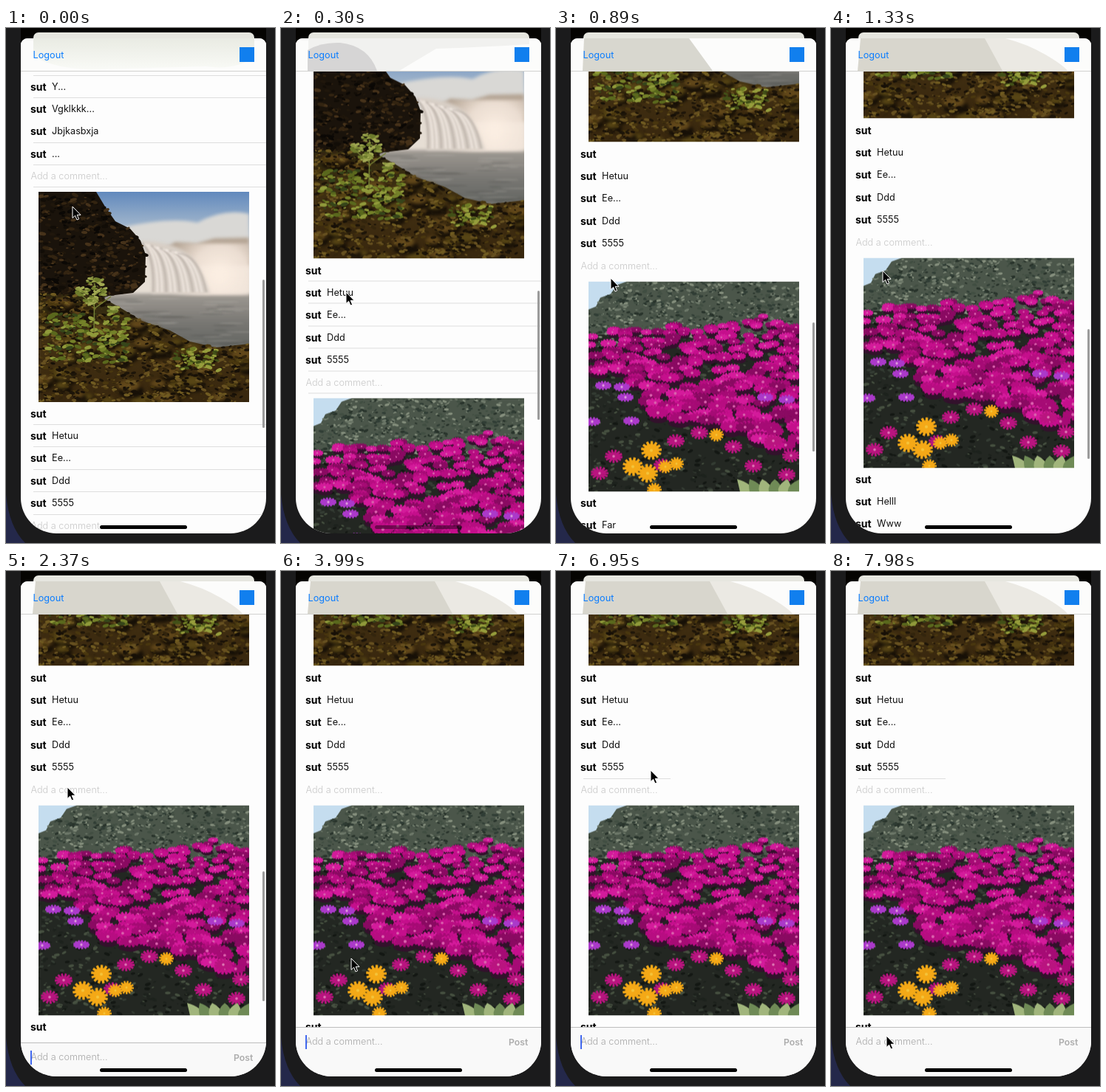
An HTML page with a canvas that plays this animation: 364 px wide and 698 px high, repeating every 8 s.

```html
<!DOCTYPE html>
<html lang="en">
<head>
<meta charset="utf-8">
<title>Photo feed</title>
<style>
html, body { margin: 0; width: 100%; height: 100%; overflow: hidden; background: #1b1b1c; }
body { position: relative; font: 12.7px/20px Inter, "Open Sans", sans-serif; color: #111; }
body *, body { box-sizing: border-box; }
body div, body svg, body canvas, body span { position: absolute; white-space: nowrap; }
.anim { animation: 8s step-end infinite; }

#corner { left: 0; top: 0; }
#behind { left: 20px; top: 0; width: 332px; height: 685px; background: #050402; border-radius: 0 0 48px 48px; }
#card { left: 37px; top: 6px; width: 299px; height: 20px; background: #e6e6df; border-radius: 7px 7px 0 0; }
#screen { left: 20px; top: 14px; width: 332px; height: 671px; background: #fdfdfd;
  border-radius: 9px 9px 48px 48px; overflow: hidden; }

/* Feed coordinates are stage coordinates at rest */
#feed { left: -20px; top: -14px; width: 364px; height: 1200px; animation-name: scroll; }
#feed canvas { left: 44px; }
.name { left: 33px; font-size: 14px; font-weight: 700; color: #000; }
.text { left: 62px; }
.hint { left: 33.5px; color: #c9c9c9; font-weight: 300; }
.rule { left: 37px; width: 315px; height: 1px; background: #dedede; animation-name: rules; }
.early { animation-name: early; }
.late { animation-name: late; }
#restored { left: 37px; top: 659px; width: 118px; height: 1px; background: #dedede; animation-name: restored; }

#nav { left: 0; top: 0; width: 332px; height: 45px; background: #fcfcfb; border-bottom: 1px solid #d2d2d0; }
#nav svg { left: 0; top: 0; }
#logout { left: 16.5px; top: 12.5px; color: #087cff; }
#badge { left: 296px; top: 12px; width: 20px; height: 20px; background: #117fee; }
#tint0 { animation-name: tint0; }
#tint1 { animation-name: tint1; }
#tint2 { animation-name: tint2; }
#tint3 { animation-name: tint3; }

#thumb { left: 327px; top: 0; width: 3px; border-radius: 2px; background: #9b9b9b; animation-name: thumb; }
#bar { left: 0; top: 604px; width: 332px; height: 90px; background: #f9f9f9; border-top: 1px solid #bdbdbd;
  animation-name: bar; }
#bar .hint { left: 13.5px; top: 9px; color: #a9a9a9; }
#post { left: 288px; top: 10px; font-size: 12.3px; font-weight: 600; color: #adadad; }
#caret { left: 13px; top: 9.5px; width: 1.8px; height: 19px; background: #4168ee; animation-name: caret; }
#home { left: 107px; top: 660px; width: 118px; height: 5px; border-radius: 2.5px; background: #000; animation-name: home; }
#pointer { left: 0; top: 0; overflow: visible; animation-name: pointer; }

@keyframes scroll {
  0% { transform: translateY(0); }
  1.8% { transform: translateY(-64px); }
  3.7% { transform: translateY(-194.5px); }
  5.4% { transform: translateY(-254px); }
  7.3% { transform: translateY(-298px); }
  9.2% { transform: translateY(-330px); }
  11.1% { transform: translateY(-352.5px); }
  12.9% { transform: translateY(-367px); }
  14.8% { transform: translateY(-378px); }
  16.6% { transform: translateY(-384.5px); }
  18.4%, 100% { transform: translateY(-378.5px); }
}
@keyframes thumb {
  0% { transform: translateY(327px); height: 201px; opacity: 1; }
  1.8% { transform: translateY(333px); height: 190px; }
  3.7% { transform: translateY(342px); height: 175px; }
  5.4% { transform: translateY(359px); height: 175px; }
  7.3% { transform: translateY(371px); height: 175px; }
  9.2% { transform: translateY(379px); height: 175px; }
  11.1% { transform: translateY(385px); height: 175px; }
  12.9% { transform: translateY(389px); height: 176px; }
  14.8% { transform: translateY(392px); height: 176px; }
  16.6% { transform: translateY(394px); height: 176px; }
  18.4% { transform: translateY(393px); height: 176px; opacity: 1; }
  40.7% { transform: translateY(393px); height: 176px; opacity: .45; }
  42.4%, 100% { transform: translateY(393px); height: 176px; opacity: 0; }
}
@keyframes pointer {
  0% { transform: translate(90px, 242px); opacity: 1; }
  1.8% { transform: translate(91px, 488px); }
  3.7% { transform: translate(88px, 358px); }
  5.4% { transform: translate(80px, 322px); }
  7.3% { transform: translate(75px, 325px); }
  9.2% { transform: translate(74px, 333px); }
  11.1% { transform: translate(74px, 339px); }
  12.9% { transform: translate(73px, 336px); }
  14.8% { transform: translate(71px, 331px); }
  16.6% { transform: translate(70px, 329px); }
  18.4% { transform: translate(70px, 340px); }
  22.1% { transform: translate(76px, 314px); }
  23.9% { transform: translate(83px, 293px); }
  46.2% { transform: translate(85px, 325px); }
  48% { transform: translate(90px, 415px); }
  49.8% { transform: translate(95px, 525px); }
  51.7% { transform: translate(96px, 615px); }
  53.5% { transform: translate(88px, 645px); }
  55.4% { transform: translate(66px, 634px); }
  57.2% { transform: translate(36px, 600px); }
  59.1% { transform: translate(6px, 560px); opacity: 1; }
  60.9% { transform: translate(-30px, 540px); opacity: 0; }
  84.9% { transform: translate(142px, 261px); opacity: 1; }
  86.8% { transform: translate(128px, 270px); }
  88.7% { transform: translate(112px, 282px); }
  90.4% { transform: translate(98px, 289px); }
  92.3% { transform: translate(90px, 294px); }
  96% { transform: translate(87px, 385px); }
  97.8% { transform: translate(80px, 540px); }
  99.7%, 100% { transform: translate(75px, 630px); opacity: 1; }
}
@keyframes bar {
  0% { transform: translateY(80px); }
  29.6% { transform: translateY(21px); }
  31.4% { transform: translateY(7px); }
  33.2% { transform: translateY(2px); }
  35.1%, 100% { transform: none; }
}
@keyframes caret {
  0% { opacity: 1; }
  40.7% { opacity: .5; }
  42.4% { opacity: 0; }
  46.2% { opacity: 1; }
  53.5% { opacity: 0; }
  59.1% { opacity: 1; }
  64.6% { opacity: .5; }
  66.4% { opacity: 0; }
  71.9% { opacity: .5; }
  73.8% { opacity: 1; }
  77.4% { opacity: 0; }
  84.9% { opacity: 1; }
  90.4%, 100% { opacity: 0; }
}
@keyframes home { 0% { opacity: 1; } 1.8% { opacity: .4; } 7.3%, 100% { opacity: 1; } }
@keyframes rules { 0% { opacity: 1; } 7.3%, 100% { opacity: 0; } }
@keyframes restored { 0% { opacity: 0; } 84.9%, 100% { opacity: 1; } }
@keyframes early { 0% { opacity: 1; } 14.8%, 100% { opacity: 0; } }
@keyframes late { 0% { opacity: 0; } 14.8%, 100% { opacity: 1; } }
@keyframes tint0 { 0% { opacity: 1; } 1.8%, 100% { opacity: 0; } }
@keyframes tint1 { 0% { opacity: 0; } 1.8% { opacity: 1; } 7.3%, 100% { opacity: 0; } }
@keyframes tint2 { 0% { opacity: 0; } 7.3% { opacity: 1; } 14.8%, 100% { opacity: 0; } }
@keyframes tint3 { 0% { opacity: 0; } 14.8%, 100% { opacity: 1; } }
</style>
</head>
<body>
<svg id="corner" width="364" height="698"><path d="M0 632Q4 676 26 698H0Z" fill="#24284a"/></svg>
<div id="behind"></div>
<div id="card"></div>
<div id="screen">
  <div id="feed" class="anim"></div>
  <div id="nav">
    <svg width="332" height="44">
      <defs><linearGradient id="fade" x2="0" y2="1">
        <stop stop-color="#e9ebe3"/><stop offset="1" stop-color="#f9faf6"/>
      </linearGradient></defs>
      <path id="tint0" class="anim" d="M17 0H316V25Q290 44 250 38L110 42Q50 44 17 24Z" fill="url(#fade)"/>
      <g id="tint1" class="anim">
        <path d="M17 0H316V8Q250 12 190 14L140 44H17Z" fill="#f1f1ef"/>
        <path d="M16 44V16Q34 5 60 6Q98 10 110 44Z" fill="#d6d5d5"/>
      </g>
      <path id="tint2" class="anim" d="M16 44L18 0H160L192 44Z" fill="#d8d7cf"/>
      <g id="tint3" class="anim">
        <path d="M180 0H216Q246 8 270 22T300 44H205Z" fill="#ebe9e3"/>
        <path d="M16 44L20 0H188L212 44Z" fill="#d8d6cd"/>
      </g>
    </svg>
    <span id="logout">Logout</span>
    <div id="badge"></div>
  </div>
  <div id="thumb" class="anim"></div>
  <div id="bar" class="anim">
    <span class="hint">Add a comment...</span>
    <span id="post">Post</span>
    <div id="caret" class="anim"></div>
  </div>
  <div id="home" class="anim"></div>
</div>
<svg id="pointer" class="anim" width="12" height="19">
  <path d="M0 0V15.5L3.6 12.2 6 18 8.6 16.9 6.2 11.3H11Z" fill="#000" stroke="#fff"/>
</svg>

<script>
const feed = document.getElementById('feed');
const SIZE = 285;

function add(tag, className, y, text = '') {
  const el = document.createElement(tag);
  el.className = className;
  el.style.top = y + 'px';
  el.textContent = text;
  feed.append(el);
  return el;
}

function row(y, text, extra = '') {
  add('span', 'name', y - 10, 'sut');
  add('span', 'text ' + extra, y - 10, text);
}

const hint = y => add('span', 'hint', y - 10, 'Add a comment...');

function photo(y, paint) {
  const canvas = add('canvas', '', y);
  canvas.width = canvas.height = SIZE;
  paint(canvas.getContext('2d'));
}

function seeded(seed) {
  return () => (seed = seed * 16807 % 2147483647) / 2147483647;
}

function shade(ctx, y0, y1, ...colors) {
  const g = ctx.createLinearGradient(0, y0, 0, y1);
  colors.forEach((c, i) => g.addColorStop(i / (colors.length - 1), c));
  return g;
}

function shape(ctx, fill, path) {
  ctx.fillStyle = fill;
  ctx.fill(new Path2D(path));
}

function dab(ctx, color, x, y, rx, ry = rx, turn = 0) {
  ctx.fillStyle = color;
  ctx.beginPath();
  ctx.ellipse(x, y, rx, ry, turn, 0, 7);
  ctx.fill();
}

// Scatter dabs over a box, keeping those centred inside a path
function scatter(ctx, path, seed, count, [x, y, w, h], size, colors) {
  const rnd = seeded(seed), region = new Path2D(path);
  for (let i = 0; i < count; i++) {
    const r = size * (.4 + rnd()), px = x + rnd() * w, py = y + rnd() * h, turn = rnd() - .5;
    if (ctx.isPointInPath(region, px, py)) dab(ctx, colors[i % colors.length], px, py, r, r * .5, turn);
  }
}

function bloom(ctx, color, core, x, y, r, flat = .75) {
  ctx.strokeStyle = color;
  ctx.lineWidth = r * .24;
  ctx.beginPath();
  for (let a = x; a < x + 6.2; a += .48) {
    ctx.moveTo(x, y);
    ctx.lineTo(x + r * Math.cos(a), y + r * flat * Math.sin(a));
  }
  ctx.stroke();
  dab(ctx, core, x, y, r * .15);
}

function waterfall(ctx) {
  const cliff = 'M0 0H78L90 20 104 40 124 50 138 66 145 85 144 122 128 137 95 141 70 150H0Z';
  const ground = 'M0 138L80 140 112 158 140 175 178 188 205 203 240 211 285 206V285H0Z';
  ctx.fillStyle = shade(ctx, 0, 90, '#6189bd', '#9fb4cb', '#e6ded4');
  ctx.fillRect(0, 0, SIZE, SIZE);
  ctx.filter = 'blur(2px)';
  shape(ctx, '#d9d8d5', 'M115 48Q180 34 215 42Q250 22 285 30V70L140 74Z');
  shape(ctx, '#b5a595', 'M165 80L185 68 214 70 238 63 285 62V100H180Z');
  ctx.fillStyle = shade(ctx, 132, 225, '#a59f98', '#777672', '#5c5e5b');
  ctx.fillRect(-5, 138, 295, 100);
  const mist = ctx.createRadialGradient(245, 112, 5, 245, 112, 72);
  mist.addColorStop(0, '#fbeee2');
  mist.addColorStop(.5, '#f3e6dbdd');
  mist.addColorStop(1, '#f3e6db00');
  ctx.fillStyle = mist;
  ctx.fillRect(165, 70, 120, 70);
  shape(ctx, '#d8cfc6', 'M139 67Q180 66 205 86 220 100 232 138H153Q156 100 139 67Z');
  ctx.filter = 'blur(1px)';
  ctx.lineWidth = 2.5;
  for (let i = 0; i < 13; i++) {
    ctx.strokeStyle = i % 3 ? '#f8f0e8b0' : '#a99f9780';
    ctx.stroke(new Path2D(`M${140 + i * 4} ${69 + i * 1.2}Q${157 + i * 5} 84 ${155 + i * 6} 136`));
  }
  const rnd = seeded(19);
  for (let i = 0; i < 60; i++)
    dab(ctx, i % 2 ? '#c4beb640' : '#43464240', 100 + rnd() * 185, 145 + rnd() * 65, 8 + rnd() * 18, 1);

  ctx.filter = 'none';
  shape(ctx, '#1a130b', cliff);
  shape(ctx, shade(ctx, 138, 285, '#302a10', '#412f12', '#38270e'), ground);
  // Rounded boulders, lit from the upper left
  const rocks = seeded(77), region = new Path2D(ground);
  ctx.filter = 'blur(2px)';
  for (let i = 0; i < 75; i++) {
    const x = rocks() * SIZE, y = 150 + rocks() * 135, r = 7 + rocks() * 11;
    if (!ctx.isPointInPath(region, x, y - r * .5)) continue;
    dab(ctx, '#171007', x + 3, y + r * .4, r, r * .55);
    dab(ctx, i % 2 ? '#61471a' : '#574515', x, y - 1, r * .85, r * .45);
  }
  ctx.filter = 'blur(.5px)';
  scatter(ctx, cliff, 41, 620, [0, 0, 145, 150], 3.5, ['#0b0805', '#332411', '#20170c', '#46321a', '#120d07']);
  scatter(ctx, ground, 97, 1500, [0, 138, 285, 147], 3, ['#171007', '#665020', '#33250d', '#705b21', '#1d1509', '#49370f']);
  scatter(ctx, ground, 23, 190, [10, 165, 112, 66], 4, ['#5a681d', '#909a3b', '#36451a', '#748129']);
  scatter(ctx, ground, 67, 75, [185, 212, 60, 30], 3.5, ['#6f7c25', '#969d3c', '#425018']);
  ctx.strokeStyle = '#747f35';
  ctx.lineWidth = 1.5;
  ctx.stroke(new Path2D('M75 190L76 124M76 155L58 140M76 158L98 142'));
  [[74, 122, 12], [60, 135, 8], [83, 135, 8], [71, 147, 9], [102, 160, 7]].forEach(([x, y, r]) => {
    const box = [x - r, y - r * .6, 2 * r, r * 1.2];
    scatter(ctx, 'M0 0H285V285H0Z', x, 24, box, 3, ['#8c9741', '#6d7b2c', '#a2a953']);
  });
}

function flowers(ctx) {
  const all = 'M0 0H285V285H0Z';
  const bush = 'M0 38L10 34 16 22 30 17 38 5 52 0H285V90H0Z';
  const field = new Path2D('M0 66L22 62 35 50 60 62 110 58 170 60 210 52 235 43 260 52 285 52V240L235 215 200 205 175 188 120 195 85 175 72 145 40 125 0 120Z');
  ctx.fillStyle = '#c5ddef';
  ctx.fillRect(0, 0, SIZE, SIZE);
  shape(ctx, '#4b564a', bush);
  ctx.fillStyle = '#232722';
  ctx.fillRect(0, 72, SIZE, 213);
  ctx.filter = 'blur(.5px)';
  scatter(ctx, bush, 12, 1100, [0, 0, 285, 88], 2.5, ['#303d35', '#6d7869', '#414e42', '#858f7d', '#28332b']);
  scatter(ctx, all, 31, 800, [0, 80, 285, 205], 3, ['#343c33', '#131713', '#465040', '#1d221d']);
  const rnd = seeded(512);
  const pinks = ['#c50f8c', '#d41b9b', '#a60b75', '#b70d81', '#8a0a62'];
  ctx.filter = 'none';
  for (let i = 0; i < 420; i++) {
    const x = rnd() * SIZE, y = 42 + i * .47 + rnd() * 6, r = 5 + y * .035 + rnd() * 3;
    if (!ctx.isPointInPath(field, x, y)) continue;
    dab(ctx, '#33112c', x + 1, y + r * .55, r * .9, r * .45);
    bloom(ctx, pinks[i % 5], '#da62ad', x, y, r, .55);
  }
  [[15, 260], [223, 250], [100, 249], [34, 237], [274, 236], [196, 224], [118, 216], [250, 216], [150, 205], [268, 262]]
    .forEach(([x, y]) => bloom(ctx, '#b9147f', '#df7bb6', x, y, 12));
  [[20, 141], [45, 143], [58, 189], [5, 190], [50, 157], [268, 160], [239, 157]]
    .forEach(([x, y]) => bloom(ctx, '#ab39ca', '#dfa0dc', x, y, 11, .55));
  [[85, 229], [60, 251], [80, 260], [104, 251], [119, 247], [173, 208], [89, 282]].forEach(([x, y], i) => {
    const r = i < 3 ? 14 : 10;
    dab(ctx, '#e99b12', x, y, r * .75, r * .65);
    bloom(ctx, '#f4a917', '#f4c53c', x, y, r, .9);
  });
  for (let i = 0; i < 6; i++) {
    const x = 205 + i * 13, tip = x + (i - 2) * 4;
    shape(ctx, i % 2 ? '#6f8a56' : '#a1b57c', `M${x} 285Q${x - 2} 276 ${tip + 4} 268Q${x + 17} 274 ${x + 18} 285Z`);
  }
}

[64, 94, 155, 185, 215, 537, 567, 598, 628, 659, 689].forEach(y => add('div', 'rule anim', y));
['Y...', 'Vgklkkk...', 'Jbjkasbxja', '...'].forEach((text, i) => row(79.5 + i * 30.4, text));
hint(201);
photo(222, waterfall);
['', 'Hetuu', 'Ee...', 'Ddd', '5555'].forEach((text, i) => row(522.5 + i * 30.4, text));
hint(674.5);
photo(695.5, flowers);
row(995.5, '');
row(1025.5, 'Far', 'early anim');
add('span', 'text late anim', 1015.5, 'Helll');
row(1055.5, 'Www');
const restored = add('div', 'anim', 659);
restored.id = 'restored';
</script>
</body>
</html>
```
